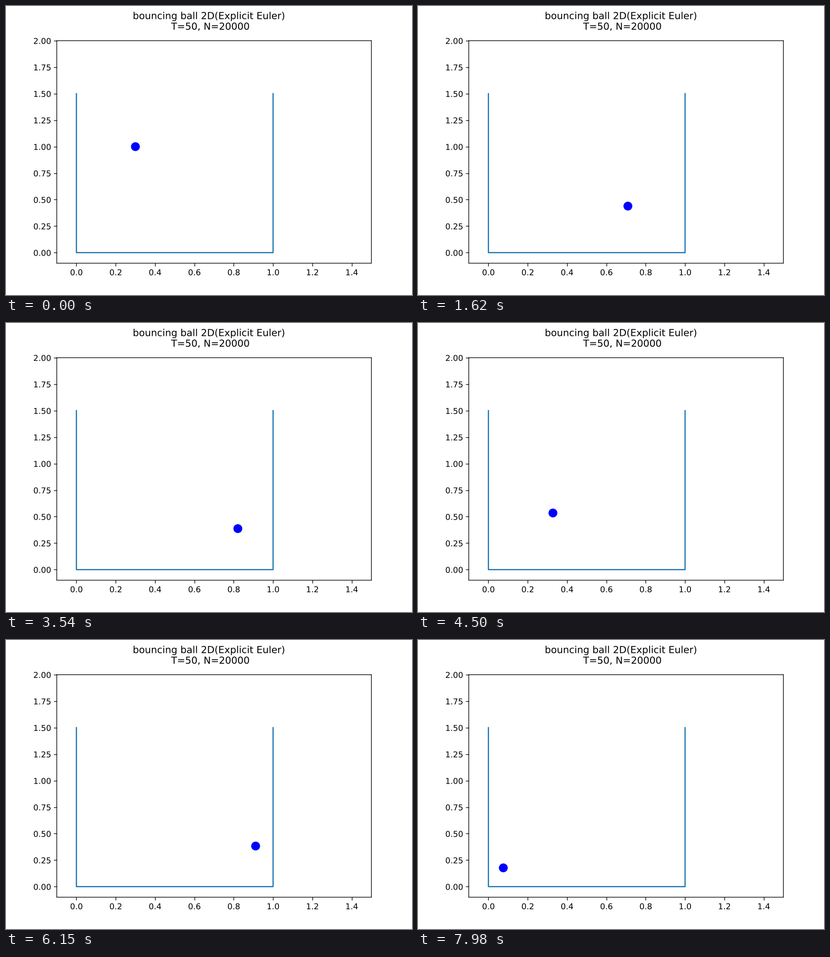
A matplotlib script that plays this animation: 885 px wide and 632 px high, repeating every 8000 ms.

```python
import matplotlib.pyplot as plt
from matplotlib.animation import FuncAnimation
from matplotlib.patheffects import Normal

# Draw lines, text and markers as outlines at sub-pixel positions.
plt.rcParams.update({
    "font.family": "DejaVu Sans",
    "path.snap": False,
    "path.effects": [Normal()],
})

T, N = 50, 20000
DT = T / N
STEPS = 5            # integration steps per frame
FRAMES = 267
G, DRAG, BOUNCE = 9.8, 0.1, 0.9
PAD_X, FLOOR = 0.02, 0.05


def simulate(count):
    """Explicit Euler with linear drag; the ball is clamped at each contact."""
    x, y, vx, vy = 0.3, 1.0, 4.0, 1.0
    path = [(x, y)]
    for n in range(1, count * STEPS):
        x, y = x + vx * DT, y + vy * DT
        vx, vy = vx - DRAG * vx * DT, vy - (G + DRAG * vy) * DT
        if x < PAD_X or x > 1 - PAD_X:
            x = min(max(x, PAD_X), 1 - PAD_X)
            vx *= -BOUNCE
        if y < FLOOR:
            y = FLOOR
            vy *= -BOUNCE
        if n % STEPS == 0:
            path.append((x, y))
    return path


path = simulate(FRAMES)

DPI = 126.4
fig = plt.figure(figsize=(885 / DPI + 1e-6, 632 / DPI + 1e-6), dpi=DPI)
ax = fig.add_axes([0.125, 0.11, 0.775, 0.77])
ax.set_xlim(-0.1, 1.5)
ax.set_ylim(-0.1, 2)
fig.suptitle(f"bouncing ball 2D(Explicit Euler)\n T={T}, N={N}")

ax.plot([0, 0, 1, 1], [1.5, 0, 0, 1.5], color="tab:blue", zorder=3)
ball, = ax.plot([], [], "o", color="blue", markersize=10, zorder=2)


def update(i):
    x, y = path[i]
    ball.set_data([x], [y])
    return ball,


anim = FuncAnimation(fig, update, frames=FRAMES, interval=30,
                     repeat=True, repeat_delay=0)
plt.show()
```
